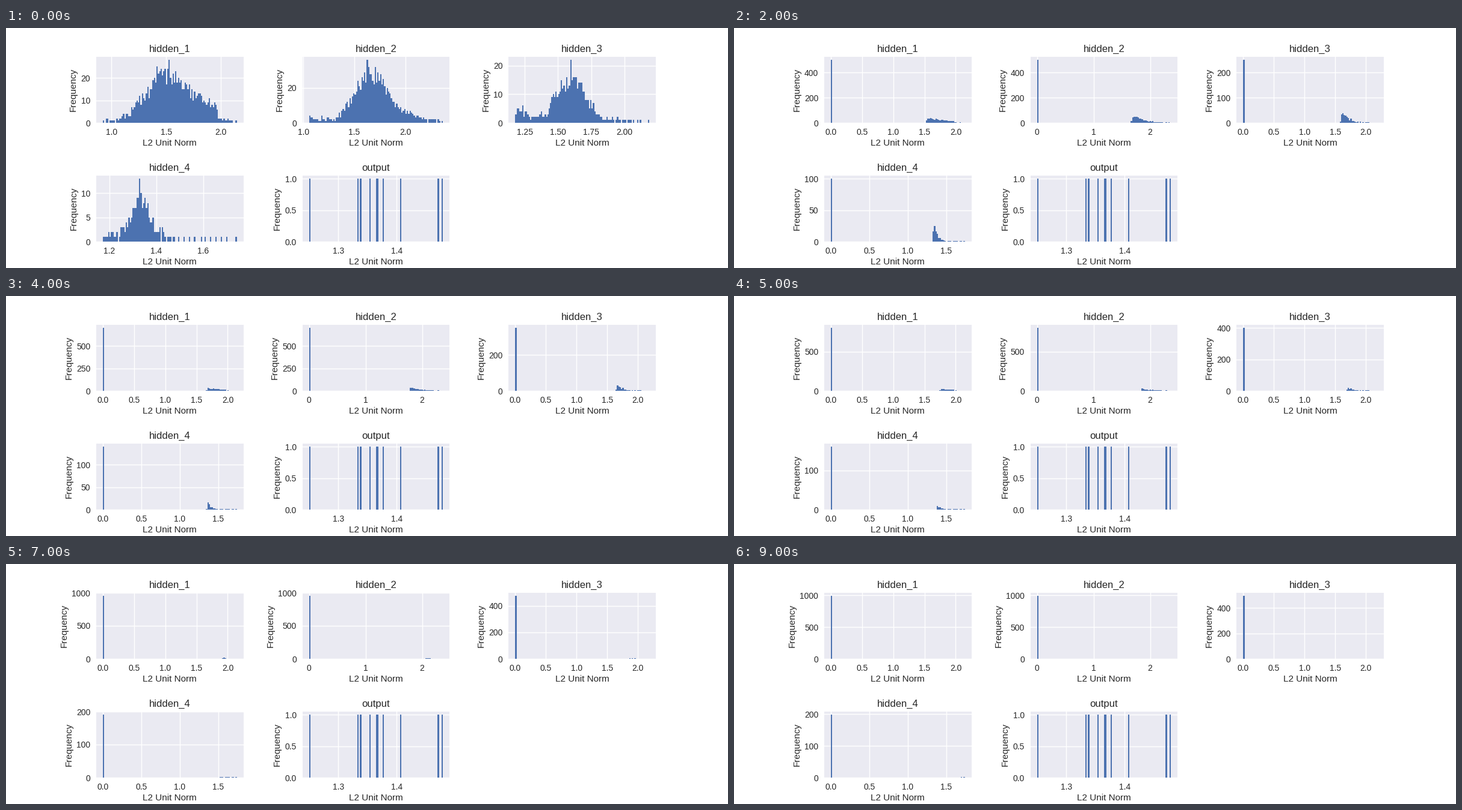
These frames come from a looping animation (1200x400 px, 10 s). A matplotlib script:

```python
import numpy as np
import matplotlib.pyplot as plt
from matplotlib.animation import FuncAnimation

BINS = 100
BLUE, PANEL, INK = "#4C72B0", "#EAEAF2", "#262626"
PRUNED = [0, 25, 50, 60, 70, 80, 90, 95, 97, 99]  # percent of units removed

plt.rcParams.update({
    "font.family": "Liberation Sans", "text.color": INK,
    "axes.titlesize": 12, "axes.labelsize": 11, "axes.labelcolor": INK,
    "axes.facecolor": PANEL, "axes.edgecolor": "white", "axes.linewidth": 0,
    "axes.axisbelow": True, "axes.grid": True,
    "grid.color": "white", "grid.linewidth": 1, "grid.linestyle": "-",
    "xtick.labelsize": 10, "ytick.labelsize": 10,
    "xtick.color": INK, "ytick.color": INK,
    "xtick.major.size": 0, "ytick.major.size": 0,
    "xtick.major.pad": 6.3, "ytick.major.pad": 7,
})


def sample_norms(lo, hi, total, peak, outline, seed):
    """Unit norms whose histogram follows a jittered outline of (bin, count) points."""
    rng = np.random.default_rng(seed)
    outline_bins, outline_counts = zip(*outline)
    rough = np.interp(np.arange(BINS), outline_bins, outline_counts)
    spread = 0.22 + 0.75 * np.exp(-rough / 3)  # sparse tails are the most ragged
    rough *= 1 + spread * rng.uniform(-1, 1, BINS)

    peak_bin, peak_count = peak
    rough[peak_bin] = 0
    steps = np.round(np.cumsum(rough) * (total - peak_count) / rough.sum())
    counts = np.diff(steps, prepend=0).astype(int)
    counts[peak_bin] = peak_count

    bins = np.repeat(np.arange(BINS), counts)
    offsets = rng.uniform(0.02, 0.98, total)
    norms = np.sort(lo + (hi - lo) / BINS * (bins + offsets))
    norms[0], norms[-1] = lo, hi
    return norms


LAYERS = {
    "hidden_1": sample_norms(
        0.921, 2.146, 1000, (49, 28),
        [(0, 1.5), (8, 1), (18, 3.5), (28, 12), (34, 14), (40, 23), (56, 21),
         (68, 12), (76, 11.5), (83, 8), (87, 2), (99, 0.5)], 3),
    "hidden_2": sample_norms(
        1.057, 2.368, 1000, (43, 36),
        [(0, 3), (18, 1.5), (24, 6), (30, 13), (36, 22), (44, 29), (50, 28),
         (60, 16), (66, 9), (76, 4.5), (86, 2), (99, 1)], 5),
    "hidden_3": sample_norms(
        1.1795, 2.183, 500, (41, 22),
        [(0, 3), (3, 5), (8, 3), (16, 1.5), (24, 4), (27, 8), (34, 14),
         (46, 15), (52, 10), (60, 3), (70, 1), (99, 0.3)], 7),
    "hidden_4": sample_norms(
        1.172, 1.743, 200, (27, 13),
        [(0, 0.8), (14, 2), (18, 4), (24, 6), (26, 9), (31, 9), (36, 5),
         (39, 2.5), (48, 1), (56, 0.3), (99, 0.2)], 9),
}
OUTPUT = 1.2498 + 0.2294 * np.array([0, 36.5, 38.5, 45.5, 50.5, 51.5, 55.5, 68.5, 96.5, 100]) / BINS


def prune(norms, percent):
    kept = norms.copy()
    kept[:round(len(norms) * percent / 100)] = 0
    return kept


def draw_histogram(ax, title, norms):
    ax.clear()
    bars = ax.hist(norms, bins=BINS, color=BLUE)[2]
    ax.set_title(title)
    ax.set_xlabel("L2 Unit Norm", labelpad=3.4)
    ax.set_ylabel("Frequency")
    # Keep a tick that falls a fraction of a pixel above the axis.
    top = ax.get_ylim()[1]
    for tick in ax.get_yticks():
        if top < tick < top * 1.004:
            for bar in bars:
                bar.set_height(bar.get_height() * tick / top)
            ax.set_ylim(0, tick)


def draw(step):
    for ax, (title, norms) in zip(axes, LAYERS.items()):
        draw_histogram(ax, title, prune(norms, PRUNED[step]))


fig = plt.figure(figsize=(12, 4), dpi=100, facecolor="white")
fig.subplots_adjust(left=0.125, right=0.9, bottom=0.11, top=0.88, wspace=0.4, hspace=0.8)
axes = [fig.add_subplot(2, 3, i + 1) for i in range(5)]
draw_histogram(axes[4], "output", OUTPUT)

anim = FuncAnimation(fig, draw, frames=len(PRUNED), interval=1000, repeat=True)
plt.show()
```
